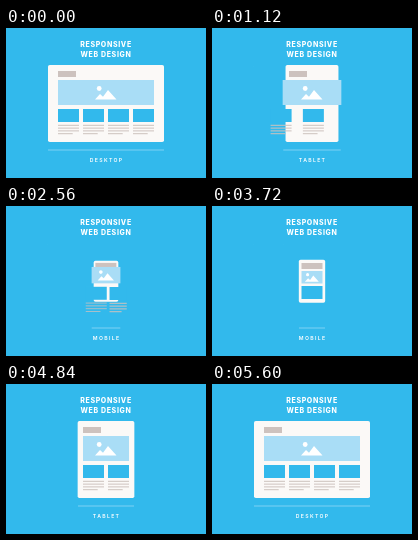
Animation of 200x150 px, one loop 5.72 s. Source, as an HTML page:

```html
<!DOCTYPE html>
<html lang="en">
<head>
<meta charset="utf-8">
<title>Responsive web design</title>
<style>
  html, body { margin: 0; width: 100%; height: 100%; overflow: hidden; background: #32b9ec; }
  svg { display: block; width: 100%; height: 100%; }
  text { font-family: Inter, "Open Sans", sans-serif; fill: #fff; text-anchor: middle; }
  .title { font-size: 7px; font-weight: 800; letter-spacing: .65px; }
  #label { font-size: 5.2px; font-weight: 600; letter-spacing: 1.3px; }
  #body { fill: #fbf9f7; }
  #logo, .lines { fill: #cdc2be; }
  .card { fill: #32b9ec; }
  #hero { fill: #a9ddf6; }
  #icon { fill: #fff; }
  #rule { fill: #8ed6f4; }
</style>
</head>
<body>
<svg viewBox="0 0 200 150">
  <text class="title" x="100" y="19.4">RESPONSIVE</text>
  <text class="title" x="100" y="29.2">WEB DESIGN</text>
  <rect id="body" rx="1.8"/>
  <rect id="logo"/>
  <g id="columns"></g>
  <rect id="hero"/>
  <g id="icon">
    <circle cx="-6.8" cy="-4" r="2.4"/>
    <path d="M-11 7L-6 1.5L-3 4.2L2 -2.6L10.5 7Z"/>
  </g>
  <rect id="rule" y="121.6" height=".8"/>
  <text id="label" x="100.6" y="133.8"></text>
</svg>
<script>
const LOOP = 5720;
const COLUMN = 21, GAP = 4, PITCH = COLUMN + GAP;
const $ = id => document.getElementById(id);

// Every layout follows from its number of columns; a single column is the compact one.
function makeLayout(name, count) {
  const compact = count === 1;
  const width = count * PITCH - GAP;
  const left = 100 - width / 2;
  const pad = 2.5 * count;
  return {
    name,
    body: [left - pad, compact ? 54 : 37, width + 2 * pad, compact ? 42.5 : 77],
    logo: [left, compact ? 57 : 43, compact ? COLUMN : 18, 6],
    hero: [left, compact ? 65 : 52, width, compact ? 12.5 : 25],
    rule: [left - pad, width + 2 * pad],
    has: i => i < count,
    // x, y, width and text opacity; surplus columns collapse at the right edge
    column: i => i < count
      ? [left + PITCH * i, compact ? 80 : 81, COLUMN, compact ? 0 : 1]
      : [left + width, 81, 0, 1]
  };
}

const desktop = makeLayout("DESKTOP", 4);
const tablet = makeLayout("TABLET", 2);
const mobile = makeLayout("MOBILE", 1);

// The body moves at once; its content follows after the wait.
const steps = [
  { start: 880, layout: tablet, wait: 80 },
  { start: 2360, layout: mobile, wait: 50 },
  { start: 3720, layout: tablet, wait: 0 },
  { start: 4840, layout: desktop, wait: 400 }
];

const smooth = p => p * p * (3 - 2 * p);
const overshoot = p => 1 + 2.2 * (p - 1) ** 3 + 1.2 * (p - 1) ** 2;

function valueAt(time, pick, duration, delay, ease = smooth) {
  let value = pick(desktop);
  for (const step of steps) {
    const elapsed = time - step.start - delay(step);
    if (elapsed < 0) break;
    const p = ease(Math.min(1, elapsed / duration));
    value = pick(step.layout).map((target, i) => value[i] + (target - value[i]) * p);
  }
  return value;
}

function columnAt(time, index) {
  const delay = ({ layout, wait }) =>
    layout.has(index) ? wait + (index === 0 ? 60 : 0) : 60 * (3 - index);
  return valueAt(time, layout => layout.column(index), index > 1 ? 180 : 300, delay);
}

function setAttributes(node, attributes) {
  for (const name in attributes) node.setAttribute(name, attributes[name]);
}

function add(parent, tag, attributes = {}) {
  const node = document.createElementNS("http://www.w3.org/2000/svg", tag);
  setAttributes(node, attributes);
  return parent.appendChild(node);
}

const columns = Array.from({ length: 4 }, () => {
  const group = add($("columns"), "g");
  const card = add(group, "rect", { class: "card", height: 13 });
  const lines = add(group, "g", { class: "lines" });
  for (let i = 0; i < 4; i++) add(lines, "rect", { y: 15.8 + i * 2.8, height: 1 });
  return { group, card, lines };
});

function placeBox(id, [x, y, width, height]) {
  setAttributes($(id), { x, y, width, height });
}

function draw(time) {
  const afterWait = step => step.wait;
  placeBox("body", valueAt(time, layout => layout.body, 360, () => 0, overshoot));
  placeBox("logo", valueAt(time, layout => layout.logo, 160, afterWait));

  const hero = valueAt(time, layout => layout.hero, 240, afterWait);
  placeBox("hero", hero);
  const [left, top, heroWidth, heroHeight] = hero;
  const scale = .3 + .7 * heroHeight / 25;
  $("icon").setAttribute("transform",
    `translate(${left + heroWidth / 2} ${top + heroHeight / 2}) scale(${scale})`);

  const [x, width] = valueAt(time, layout => layout.rule, 200, step => step.wait * .75);
  setAttributes($("rule"), { x, width });

  columns.forEach(({ group, card, lines }, index) => {
    const [columnX, columnY, columnWidth, textOpacity] = columnAt(time, index);
    group.setAttribute("transform", `translate(${columnX} ${columnY})`);
    card.setAttribute("width", columnWidth);
    lines.setAttribute("opacity", textOpacity);
    [...lines.children].forEach((line, i) =>
      line.setAttribute("width", columnWidth * (i < 3 ? 1 : .7)));
  });

  const current = steps.filter(step => step.start + 80 <= time).pop();
  $("label").textContent = (current ? current.layout : desktop).name;
}

const begin = performance.now();
function tick() {
  draw((performance.now() - begin) % LOOP);
  requestAnimationFrame(tick);
}
tick();
</script>
</body>
</html>
```
